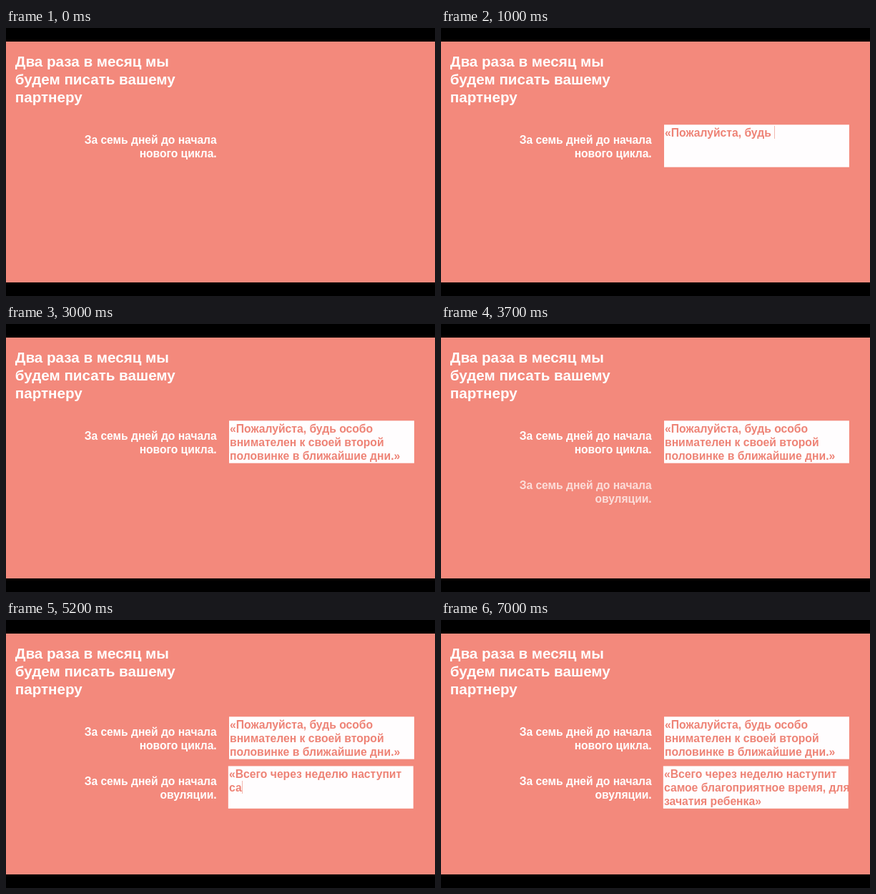
Recreate the animation shown at these times as an HTML page with a canvas. Size 600 px wide and 375 px high, loop 7.1 s.

```html
<!DOCTYPE html>
<html lang="ru">
<head>
<meta charset="utf-8">
<style>
  html, body { margin: 0; width: 100%; height: 100%; overflow: hidden; background: #000; }
  canvas { display: block; }
</style>
</head>
<body>
<canvas id="stage" width="600" height="375"></canvas>
<script>
const ctx = document.getElementById('stage').getContext('2d');
const LOOP = 7100, TICK = 100;
const PINK = '#f3897c', INK = '#ee8376', PAPER = '#fffdfe', CARET = '#f3b9b0';

const TITLE = { size: 20.6, color: '#fff', leading: 25 };
const LABEL = { size: 15.6, color: '#fff', leading: 18.9 };
const NOTE = { size: 15.7, color: INK, leading: 18.9 };

// keys: [time, typed characters]; carets: [from, to] spans of visibility
const NOTES = [
  {
    box: [312, 135.3, 258.9, 59.4], x: 313, y: 151.8, shown: 100,
    lines: ['«Пожалуйста, будь особо', 'внимателен к своей второй', 'половинке в ближайшие дни.»'],
    keys: [[500, 0], [600, 1], [1000, 18], [1300, 34], [1500, 34], [1600, 35], [2000, 53], [2300, 68], [2500, 77]],
    carets: [[200, 400], [600, 1400], [1600, 2600], [2800, 3000]]
  },
  {
    box: [310.8, 204.4, 258.9, 59.4], x: 312, y: 221, shown: 4100,
    lines: ['«Всего через неделю наступит', 'самое благоприятное время, для', 'зачатия ребенка»'],
    keys: [[4500, 0], [4600, 1], [5200, 31], [5300, 36], [6100, 57], [6800, 76]],
    carets: [[4200, 4400], [4600, 7000]]
  }
];

function drawLines(lines, x, y, style, align = 'left') {
  ctx.font = `bold ${style.size}px "Liberation Sans", Arial, sans-serif`;
  ctx.fillStyle = style.color;
  ctx.textAlign = align;
  lines.forEach((line, i) => ctx.fillText(line, x, y + i * style.leading));
}

function valueAt(keys, t) {
  if (t <= keys[0][0]) return keys[0][1];
  for (let i = 1; i < keys.length; i++) {
    const [t0, a] = keys[i - 1], [t1, b] = keys[i];
    if (t <= t1) return a + (b - a) * (t - t0) / (t1 - t0);
  }
  return keys[keys.length - 1][1];
}

function drawNote(note, t) {
  if (t < note.shown) return;
  ctx.fillStyle = PAPER;
  ctx.fillRect(...note.box);
  const count = Math.round(valueAt(note.keys, t));
  const typed = note.lines.join('\n').slice(0, count).split('\n');
  drawLines(typed, note.x, note.y, NOTE);
  if (note.carets.some(([from, to]) => t >= from && t < to)) {
    const row = typed.length - 1;
    const x = Math.round(note.x + ctx.measureText(typed[row]).width);
    ctx.fillStyle = CARET;
    ctx.fillRect(x, Math.round(note.y - 14.8 + row * NOTE.leading), 1, 18);
  }
}

function draw(t) {
  ctx.fillStyle = '#000';
  ctx.fillRect(0, 0, 600, 375);
  ctx.fillStyle = PINK;
  ctx.fillRect(0, 19, 600, 337);

  drawLines(['Два раза в месяц мы', 'будем писать вашему', 'партнеру'], 12.8, 53.9, TITLE);
  drawLines(['За семь дней до начала', 'нового цикла.'], 294.7, 161.7, LABEL, 'right');

  ctx.globalAlpha = Math.min(1, Math.max(0, (t - 3200) / 700));
  drawLines(['За семь дней до начала', 'овуляции.'], 294.7, 230.8, LABEL, 'right');
  ctx.globalAlpha = 1;

  NOTES.forEach(note => drawNote(note, t));
}

const start = performance.now();
function frame() {
  const t = (performance.now() - start) % LOOP;
  draw(Math.floor(t / TICK) * TICK);
  requestAnimationFrame(frame);
}
frame();
</script>
</body>
</html>
```
